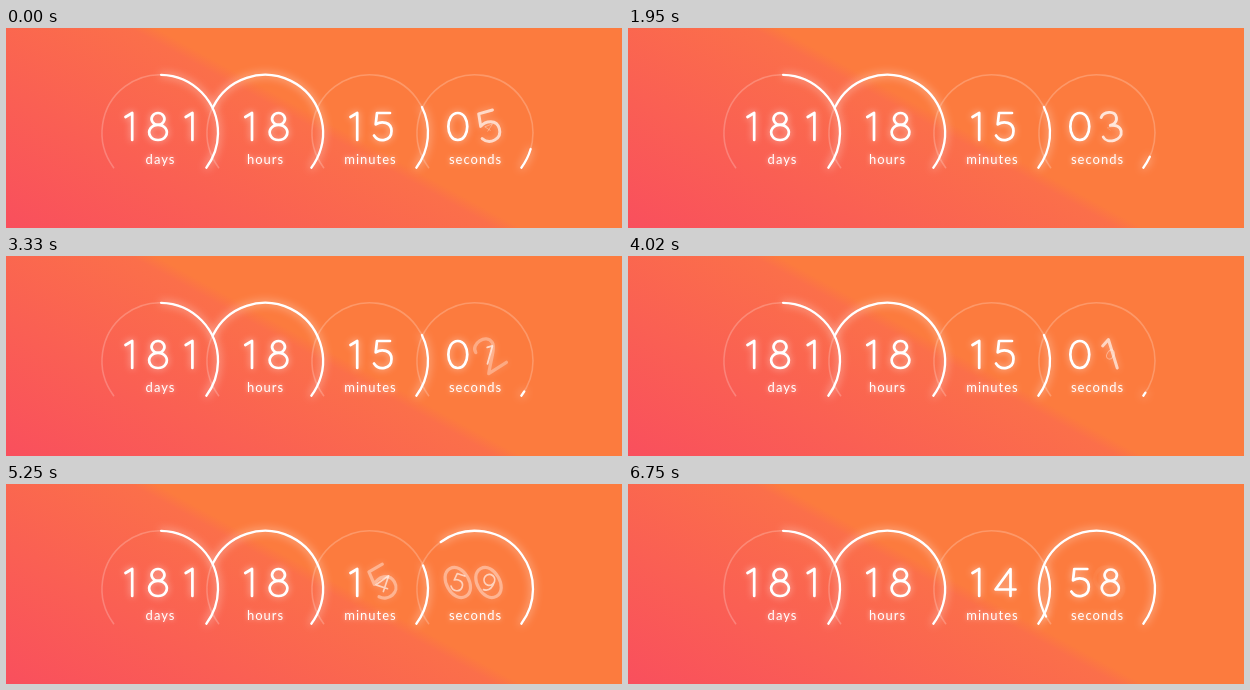
An HTML page with a canvas that plays this animation: 616 px wide and 200 px high, repeating every 6780 ms.

```html
<!DOCTYPE html>
<html lang="en">
<head>
<meta charset="utf-8">
<title>Countdown</title>
<style>
  html, body { margin: 0; width: 100%; height: 100%; overflow: hidden; background: #fc7b3e; }
  canvas { display: block; }
</style>
</head>
<body>
<canvas id="stage" width="616" height="200"></canvas>
<script>
const ctx = document.getElementById('stage').getContext('2d');
const LOOP = 6780, TICK = 1000, OFFSET = 95, MOVE = 910;
const START = 15 * 60 + 5;
const RAD = Math.PI / 180, END = 37, SWEEP = 254, RADIUS = 58;

// Single-stroke digits, centred on the origin, about 30 px tall.
const DIGITS = [
  'M0-13.5C12.6-13.5 12.6 13.5 0 13.5C-12.6 13.5-12.6-13.5 0-13.5Z',
  'M-4.5-9.5L2.2-13.5V13.5',
  'M-8-7C-8-15.5 8-16 8-6.5C8-2-1 5-8.5 13.5H9',
  'M-7-10C-4-15 7-14.5 7-7.5C7-3 3-1 0-1C5-1 9 2 9 6C9 15-6 16-8.5 8.5',
  'M6 13.5V-13.5L-9 7H11',
  'M7.5-13.5H-5.5L-6.8-2C-1-6 9-4.5 9 4.5C9 14.5-3.5 16.5-8.5 9',
  'M5-13.5C-3-9-9-2-9 5A9 8.5 0 1 0 9 5A9 8.5 0 1 0-9 5',
  'M-8.5-13.5H8.5L-3 13.5',
  'M0-1.7a6.4 5.9 0 1 1 .01 0a8.8 7.6 0 1 1-.01 0Z',
  'M8.8-4.5a8.8 9 0 1 0-17.6 0a8.8 9 0 1 0 17.6 0C8.8 4 6 13.5-4 13.5'
].map(d => new Path2D(d));

const DIALS = [
  { label: 'days', x: 154, max: 365, slots: [124, 152, 184.2], value: () => 181 },
  { label: 'hours', x: 259, max: 24, slots: [243.8, 272.5], value: () => 18 },
  { label: 'minutes', x: 364, max: 60, slots: [349, 376.5], value: s => Math.floor(s / 60) },
  { label: 'seconds', x: 469, max: 60, slots: [451.8, 482.5], value: s => s % 60 }
];

const background = ctx.createLinearGradient(0, 200, 118.7, -17);
background.addColorStop(0, '#f94f5d');
background.addColorStop(.95, '#fb6f4a');
background.addColorStop(1, '#fc7b3e');

const mix = (a, b, p) => a + (b - a) * p;

// Cubic Bezier (.25, .1, .25, 1), solved by bisection.
function ease(x) {
  let lo = 0, hi = 1, s;
  for (let i = 0; i < 20; i++) {
    s = (lo + hi) / 2;
    if (.75 * s * (1 - s) + s ** 3 < x) lo = s; else hi = s;
  }
  return .3 * s * (1 - s) ** 2 + 3 * s * s * (1 - s) + s ** 3;
}

function glow(alpha, blur) {
  ctx.shadowColor = `rgba(255,255,255,${alpha})`;
  ctx.shadowBlur = blur;
}

function drawArc(x, part, alpha) {
  if (part <= 0) return;
  ctx.globalAlpha = alpha;
  ctx.beginPath();
  ctx.arc(x, 104.8, RADIUS, (END - SWEEP * part) * RAD, END * RAD);
  ctx.stroke();
  ctx.globalAlpha = 1;
}

function drawDigit(n, x, alpha = 1, scale = 1, angle = 0) {
  if (alpha <= 0 || scale <= 0) return;
  ctx.save();
  ctx.translate(x, 98.5);
  ctx.rotate(angle * RAD);
  ctx.scale(scale, scale);
  ctx.globalAlpha = alpha;
  ctx.stroke(DIGITS[n]);
  ctx.restore();
}

function drawDial({ label, x, max, slots, value }, seconds, time) {
  const from = value(seconds), to = value(seconds - 1);

  ctx.lineWidth = 1.6;
  glow(0, 0);
  drawArc(x, 1, .22);
  ctx.lineWidth = 2.3;
  glow(.8, 8);
  drawArc(x, mix(from, to, ease(time)) / max, 1);

  ctx.lineWidth = 2.7;
  glow(.6, 7);
  const turn = Math.sqrt(time);
  const digits = n => String(n).padStart(slots.length, '0');
  slots.forEach((slot, i) => {
    const a = digits(from)[i], b = digits(to)[i];
    if (a === b) return drawDigit(a, slot);
    drawDigit(a, slot, 1 - turn, 1 + .3 * turn, -48 * turn);
    drawDigit(b, slot, turn, turn, 48 * (1 - turn));
  });

  glow(.6, 4);
  ctx.fillText(label, x + .5, 136);
}

function draw(now) {
  const t = now % LOOP + OFFSET;
  const seconds = START - Math.floor(t / TICK);
  const time = Math.min(1, t % TICK / MOVE);

  glow(0, 0);
  ctx.fillStyle = background;
  ctx.fillRect(0, 0, 616, 200);
  ctx.strokeStyle = ctx.fillStyle = '#fff';
  ctx.lineJoin = ctx.lineCap = 'round';
  ctx.font = '13px Lato, sans-serif';
  ctx.letterSpacing = '1px';
  ctx.textAlign = 'center';
  DIALS.forEach(dial => drawDial(dial, seconds, time));
}

const begin = performance.now();
function frame() {
  draw(performance.now() - begin);
  requestAnimationFrame(frame);
}
frame();
</script>
</body>
</html>
```
